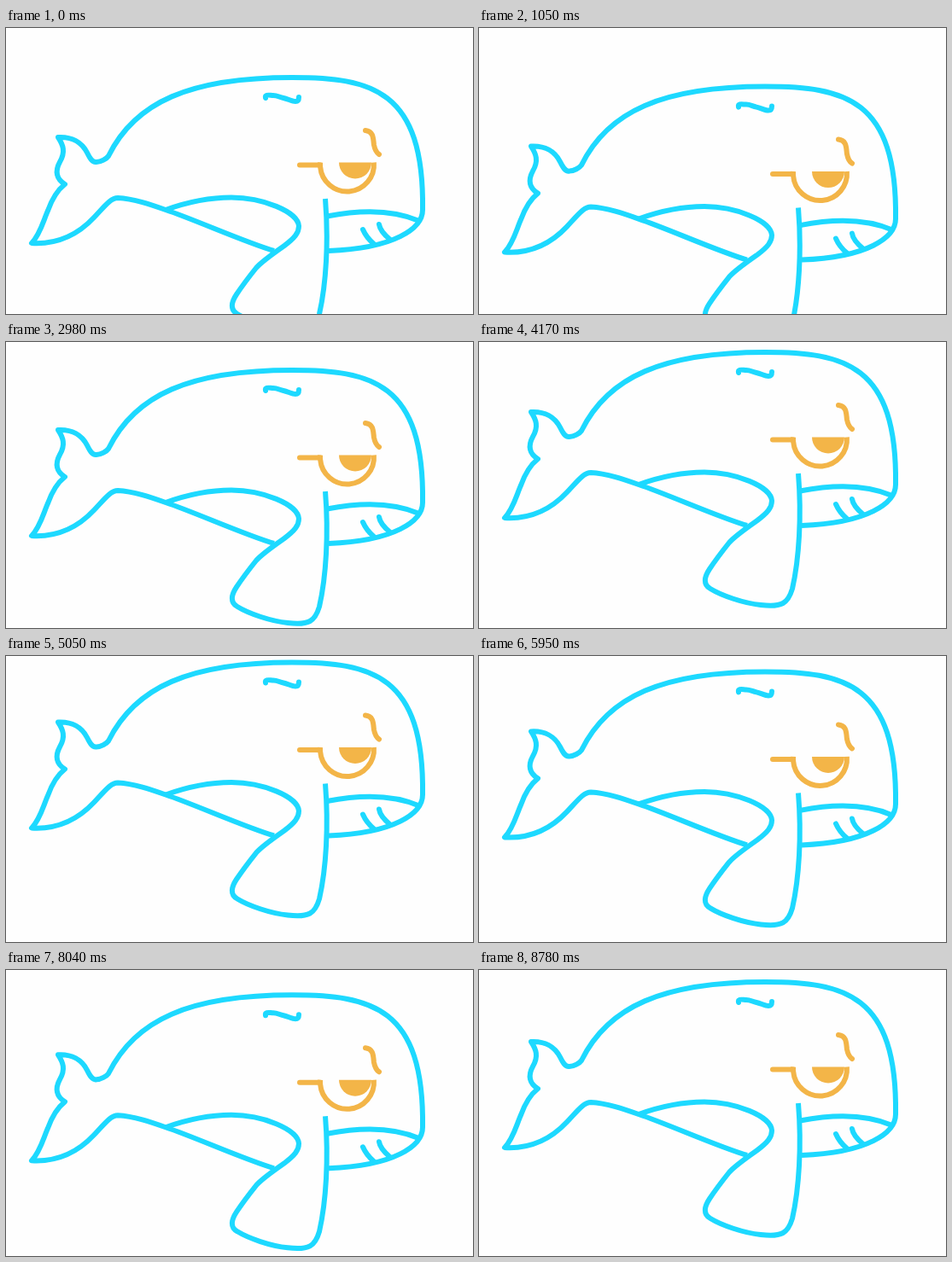
Animation of 547 by 335 pixels, one loop 8880 ms. Source, as an HTML page with a canvas:

```html
<!DOCTYPE html>
<html lang="en">
<head>
<meta charset="utf-8">
<title>Whale</title>
<style>
  html, body { margin: 0; width: 100%; height: 100%; overflow: hidden; background: #fefefe; }
  canvas { display: block; }
</style>
</head>
<body>
<canvas id="stage" width="547" height="335"></canvas>
<script>
const ctx = document.getElementById('stage').getContext('2d');
const BLUE = '#1dd9ff', GOLD = '#f3b548', PAPER = '#fefefe';
const LOOP = 8880, STEPS = 60;

// Most steps last 150 ms, a few are 10 ms shorter.
const shortSteps = new Set([8, 14, 23, 28, 36, 49, 57]);
const starts = [0];
for (let k = 0; k < STEPS - 1; k++) starts.push(starts[k] + (shortSteps.has(k) ? 140 : 150));

// Vertical drift: [time in ms, offset in px].
const drift = [
  [0, 0], [1050, 10.6], [1300, 11.2], [2230, 2], [2980, -25], [3280, -33.5],
  [4170, -46], [4460, -48.7], [4900, -50.5], [5650, -46.7], [5950, -39.6],
  [6700, -28.6], [7150, -26.3], [7450, -25.6], [7890, -27.2], [8780, -44]
];

const secant = i => (drift[i + 1][1] - drift[i][1]) / (drift[i + 1][0] - drift[i][0]);

// Harmonic mean of neighbouring secants keeps the curve free of overshoot.
const slopes = drift.map((_, i) => {
  if (i === 0) return secant(0);
  if (i === drift.length - 1) return secant(i - 1);
  const a = secant(i - 1), b = secant(i);
  return a * b > 0 ? 2 * a * b / (a + b) : 0;
});

function offsetAt(t) {
  let i = 0;
  while (i < drift.length - 2 && t > drift[i + 1][0]) i++;
  const [t0, y0] = drift[i], [t1, y1] = drift[i + 1];
  const h = t1 - t0, u = (t - t0) / h, v = 1 - u;
  return v * v * ((1 + 2 * u) * y0 + u * h * slopes[i]) +
         u * u * ((1 + 2 * v) * y1 - v * h * slopes[i + 1]);
}

const body = new Path2D(`M378 261 C455 258 488 235 488 213 C490 72 428 58 335 58
  C215 58 151 87 120 150 C118 153 111 157 106 157 C101 158 98 152 95 146
  C89 134 77 127 61 128 C67 137 70 145 63 157 C57 168 59 177 69 183
  C60 190 54 200 49 214 C44 225 40 242 30 252 C65 254 88 238 103 222
  C117 207 123 199 131 199 C150 200 170 207 187 213 C220 224 280 251 314 261`);
const fin = new Path2D(`M374 200 C378 250 375 300 367 335 C362 352 355 357 330 354
  C310 352 284 343 271 335 C262 330 264 321 270 312 C276 303 285 291 293 281
  C300 273 316 262 326 255 C338 246 343 240 343 232
  C342 215 300 198.5 264 198.5 C238 198.5 212 204 187 213`);
const mouth = new Path2D('M376 220.5 C399 216 445 209 484 226');
const grooves = new Path2D('M418 236 C421 243 425 248 431 253 M437 230 C438 237 444 243 450 248');
const blowhole = new Path2D('M304 82 C303 77 309 79 313 79 C318 79 320 81 325 82 C330 83 335 86 339 86 C342 86 343 84 343 81');
const brow = new Path2D('M421 120 C431 121 430 130 431 137 C432 142 434 146 437 148');
const lid = new Path2D('M344 160.5 H368');
const rim = new Path2D();
rim.arc(399.5, 160, 31.5, -0.08, Math.PI + 0.08);
const pupil = new Path2D();
pupil.arc(409, 157.5, 19, 0, Math.PI);

function stroke(path, color, cap = 'round') {
  ctx.strokeStyle = color;
  ctx.lineCap = cap;
  ctx.stroke(path);
}

function draw(y) {
  ctx.setTransform(1, 0, 0, 1, 0, 0);
  ctx.fillStyle = PAPER;
  ctx.fillRect(0, 0, 547, 335);
  ctx.translate(0, y);
  ctx.lineWidth = 6;
  ctx.lineJoin = 'round';
  stroke(body, BLUE, 'butt');
  stroke(mouth, BLUE, 'butt');
  stroke(fin, BLUE, 'butt');
  stroke(grooves, BLUE);
  stroke(blowhole, BLUE);
  stroke(brow, GOLD);
  stroke(lid, GOLD);
  stroke(rim, GOLD, 'butt');
  ctx.fillStyle = GOLD;
  ctx.fill(pupil);
}

const origin = performance.now();

function tick() {
  const t = Math.max(0, performance.now() - origin) % LOOP;
  let k = STEPS - 1;
  while (starts[k] > t) k--;
  draw(offsetAt(starts[k]));
  requestAnimationFrame(tick);
}
tick();
</script>
</body>
</html>
```
